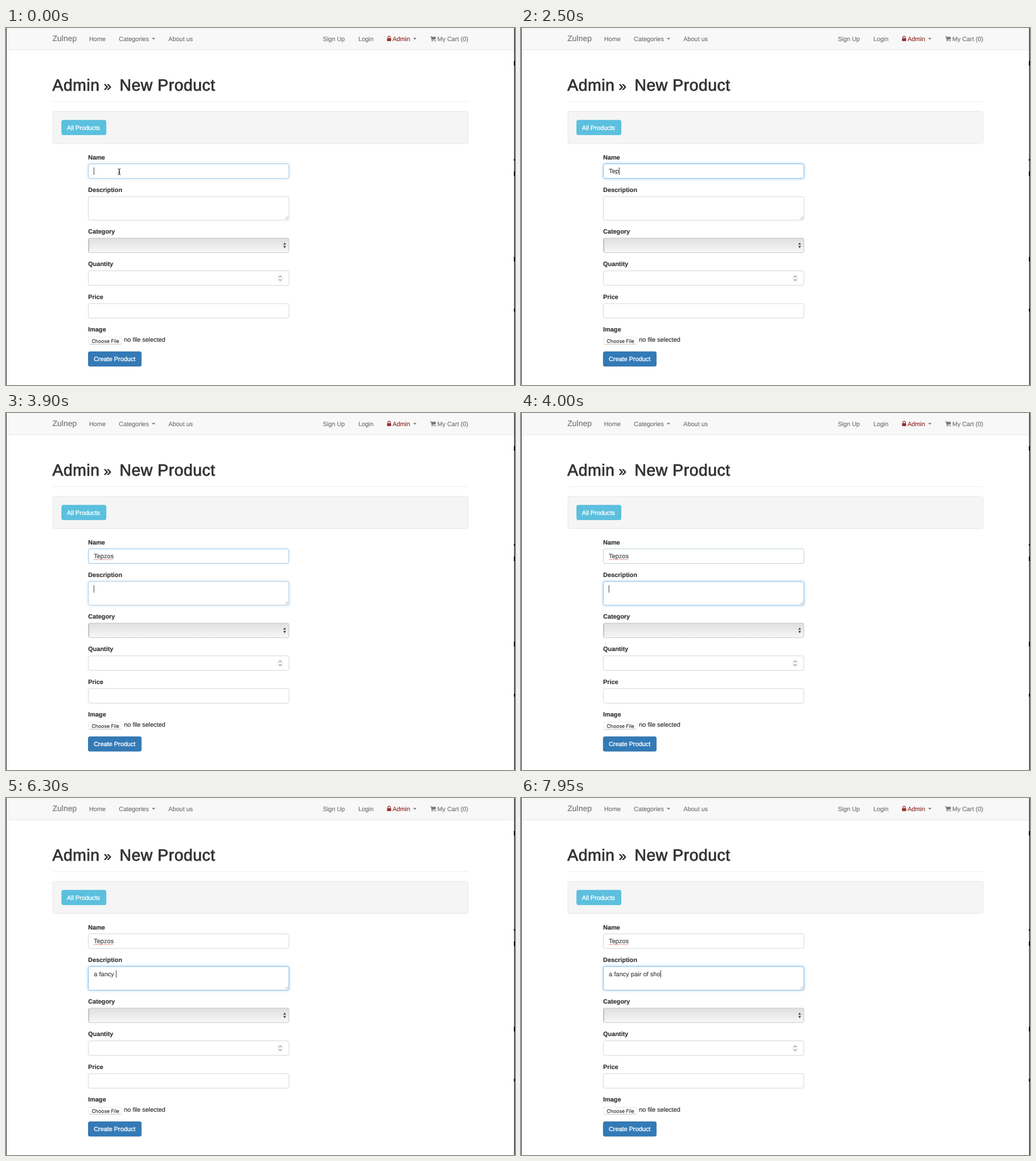
An HTML page for the animation above (8000 ms loop, 894x627 px).

```html
<!DOCTYPE html>
<html lang="en">
<head>
<meta charset="utf-8">
<title>New Product</title>
<style>
  html, body { margin: 0; width: 100%; height: 100%; overflow: hidden; background: #fff; }
  svg { display: block; }
  text { font: 10.87px "Liberation Sans", Arial, sans-serif; fill: #333; stroke: #333; stroke-width: .2px; white-space: pre; text-rendering: geometricPrecision; }
  .link text { fill: #777; stroke: #777; }
  .link .brand { font-size: 13.98px; }
  .link .admin { fill: #96302f; stroke: #96302f; }
  .label text { font-weight: bold; }
  .title { font-size: 28.4px; letter-spacing: .5px; stroke-width: .85px; }
  .title .mark { font-size: 24px; }
  .white text { fill: #fff; stroke: #fff; stroke-width: .35px; }
  .typed { fill: #444; stroke: #444; letter-spacing: .1px; }
  .choose { font: 8.7px Inter, sans-serif; fill: #222; stroke: #222; stroke-width: .1px; }
  .field rect { x: 144.6px; width: 352.3px; height: 25.6px; rx: 2.9px; fill: #fff; stroke: #ccc; stroke-width: .8px; }
  .field .tall { height: 41.6px; }
  .field .select { fill: url(#shade); stroke: #bbb; }
</style>
</head>
<body>
<svg width="894" height="627" viewBox="0 0 894 627">
  <defs>
    <linearGradient id="shade" x2="0" y2="1">
      <stop stop-color="#dfdfdf"/>
      <stop offset="1" stop-color="#f7f7f7"/>
    </linearGradient>
  </defs>

  <path d="M0 0h893v38h-893z" fill="#f8f8f8"/>
  <path d="M0 38.5h893" stroke="#e7e7e7"/>
  <path d="M82 129.5h730" stroke="#eee"/>
  <rect x="82.4" y="146.4" width="729.2" height="56.6" rx="3" fill="#f5f5f5" stroke="#e3e3e3" stroke-width=".8"/>
  <rect x="97.9" y="161.9" width="77.8" height="25.7" rx="2.7" fill="#5bc0de" stroke="#46b8da" stroke-width=".8"/>
  <rect x="144.5" y="568.5" width="93.2" height="25.6" rx="2.7" fill="#337ab7" stroke="#2e6da4" stroke-width=".8"/>

  <g class="field">
    <rect id="nameBox" y="238.6"/>
    <rect id="descBox" class="tall" y="296"/>
    <rect class="select" y="369"/>
    <rect y="426.5"/>
    <rect y="484"/>
  </g>
  <path d="M145.7 371v21.5" stroke="#aaa" stroke-opacity=".6" stroke-width="1.4"/>

  <g class="link">
    <text class="brand" x="81.5" y="23.2">Zulnep</text>
    <text x="146" y="22.5">Home</text>
    <text x="198.3" y="22.5">Categories</text>
    <text x="285.3" y="22.5">About us</text>
    <text x="556.5" y="22.5">Sign Up</text>
    <text x="619" y="22.5">Login</text>
    <text class="admin" x="679" y="22.5">Admin</text>
    <text x="757.5" y="22.5">My Cart (0)</text>
  </g>
  <path d="M256 17.5h6.2l-3.1 3.1zM715 17.5h6.2l-3.1 3.1z" fill="#777"/>
  <g fill="#96302f">
    <rect x="669.3" y="18" width="7.2" height="5" rx=".7"/>
    <path d="M670.9 18v-1.6a2 2 0 0 1 4 0v1.6" fill="none" stroke="#96302f" stroke-width="1.3"/>
  </g>
  <g fill="#777">
    <path d="M745 14.6h2l.4 1h7.8l-.6 4.1-6.3.8.2.7h6.2v.9h-7l-1.4-6.5H745z"/>
    <circle cx="748.6" cy="22.8" r=".9"/>
    <circle cx="753.9" cy="22.8" r=".9"/>
  </g>

  <text class="title" x="81.5" y="110.3">Admin <tspan class="mark" x="171.8">»</tspan><tspan x="191.2"> New Product</tspan></text>
  <g class="white">
    <text x="107" y="178.5">All Products</text>
    <text x="154.2" y="585.2">Create Product</text>
  </g>
  <g class="label">
    <text x="144.3" y="230.5">Name</text>
    <text x="144.3" y="288">Description</text>
    <text x="144.3" y="360.8">Category</text>
    <text x="144.3" y="418.2">Quantity</text>
    <text x="144.3" y="475.6">Price</text>
    <text x="144.3" y="533.2">Image</text>
  </g>
  <rect x="144.9" y="543" width="59" height="12.2" rx="2.5" fill="#fff" stroke="#ddd" stroke-width=".7"/>
  <path d="M147 555.4h55" stroke="#bbb" stroke-width=".8"/>
  <text class="choose" x="150.5" y="552.5">Choose File</text>
  <text x="207.3" y="551.2">no file selected</text>

  <path d="M490.5 335.8l5-5M493.5 335.8l2-2" stroke="#888" stroke-width=".8"/>
  <path d="M487 380.6l2.4-3.9 2.4 3.9zM487 382.8l2.4 3.9 2.4-3.9z" fill="#444"/>
  <rect x="477.5" y="433.3" width="8.2" height="12.4" rx="3.5" fill="#fff" stroke="#ddd" stroke-width=".7"/>
  <path d="M479.5 437.7l2.1-2.3 2.1 2.3M479.5 441.4l2.1 2.3 2.1-2.3" fill="none" stroke="#333"/>

  <text class="typed" id="name" x="154.2" y="255.3"></text>
  <text class="typed" id="desc" x="154.2" y="312.8"></text>
  <path id="spell" d="M154.5 257.5h33.5" stroke="#d65a5a" stroke-dasharray="1.5 1"/>
  <rect id="caret" width="1" height="13" fill="#444"/>
  <path id="beam" d="M196.5 247.3q2.4 0 2.4 1.5v7.4q0 1.5-2.4 1.5M201.3 247.3q-2.4 0-2.4 1.5v7.4q0 1.5 2.4 1.5M197.4 253.8h3" fill="none" stroke="#222"/>

  <path d="M.5 0v627M893 0v627" stroke="#2a2a2a"/>
  <path d="M893.5 0v627" stroke="#333"/>
  <path d="M893 58v8M893 230v3M893 252v8M893 402v8M893 493v5" stroke="#000" stroke-width="2"/>
</svg>
<script>
const LOOP = 8000, TAB = 3800;
const $ = id => document.getElementById(id);
const typing = {
  name: { text: "Tepzos", keys: [1800, 2100, 2500, 2850, 3050, 3300] },
  desc: { text: "a fancy pair of shoes", keys: [
    5250, 5350, 5500, 5600, 5750, 6000, 6150, 6300,
    6600, 6700, 6850, 6950, 7050, 7200, 7350, 7500, 7650, 7800, 7950] }
};
const caretOff = [[450, 950], [1450, 1800], [4400, 4950]];

const ramp = (t, from, to) => Math.min(1, Math.max(0, (t - from) / (to - from)));
const mix = (a, b, k) => a.map((v, i) => Math.round(v + (b[i] - v) * k));
const show = (id, on) => { $(id).style.visibility = on ? "visible" : "hidden"; };

function focus(id, border, glow) {
  const style = $(id).style;
  style.stroke = `rgb(${mix([204, 204, 204], [102, 175, 233], border)})`;
  style.filter = `drop-shadow(0 0 2.6px rgba(102,175,233,${0.6 * glow}))`;
}

function type(id, t) {
  const { text, keys } = typing[id];
  const part = text.slice(0, keys.filter(k => k <= t).length);
  if ($(id).textContent !== part) $(id).textContent = part;
  return part ? $(id).getComputedTextLength() : 0;
}

function draw(t) {
  const widths = { name: type("name", t), desc: type("desc", t) };
  const active = t < TAB ? "name" : "desc";
  $("caret").setAttribute("x", 154 + Math.round(widths[active]));
  $("caret").setAttribute("y", active === "name" ? 245 : 302.5);
  show("caret", !caretOff.some(([a, b]) => t >= a && t < b));
  show("beam", t < 1800);
  show("spell", t >= TAB);

  const intro = ramp(t, -200, 150);
  focus("nameBox", intro * (1 - ramp(t, 3900, 4050)), intro * (1 - ramp(t, 3800, 3900)));
  focus("descBox", ramp(t, 3800, 4050), ramp(t, 3800, 3950));
}

function tick() {
  draw(performance.now() % LOOP);
  requestAnimationFrame(tick);
}
tick();
</script>
</body>
</html>
```
